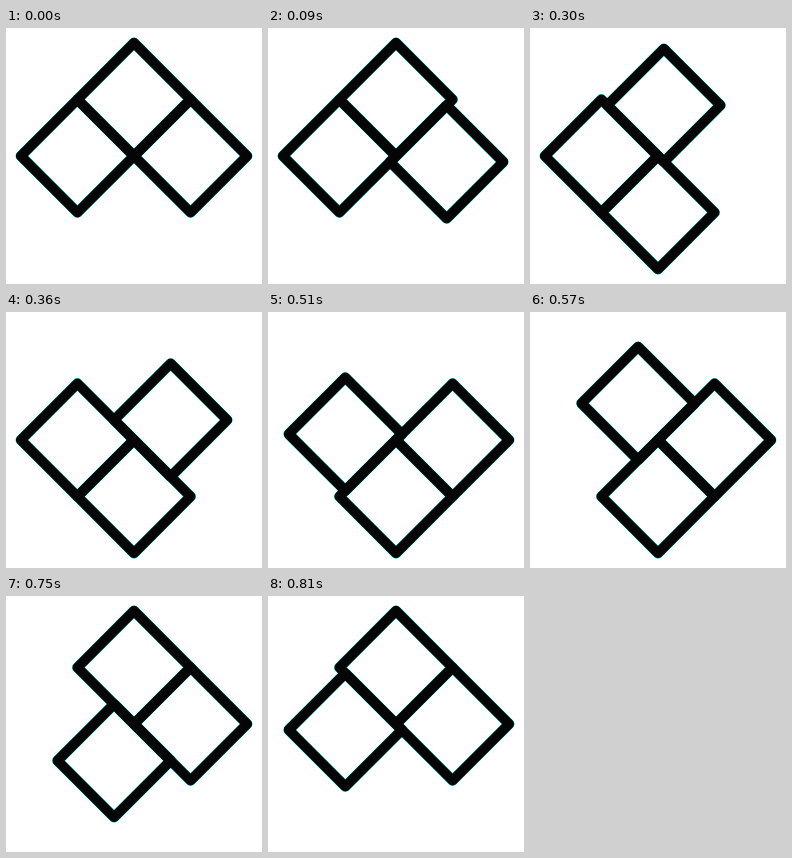
Recreate the animation shown at these times as an HTML page with a canvas. Size 256 by 256 pixels, loop 0.84 s.

```html
<!DOCTYPE html>
<html lang="en">
<head>
<meta charset="utf-8">
<title>Sliding squares</title>
<style>
  html, body { margin: 0; width: 100%; height: 100%; overflow: hidden; background: #fff; }
  canvas { display: block; width: 256px; height: 256px; }
</style>
</head>
<body>
<canvas id="stage" width="256" height="256"></canvas>
<script>
const ctx = document.getElementById('stage').getContext('2d');

const SIZE = 256, SIDE = 80;
const LOOP = 840, STEP = 30, MOVE = 210, REST = 60;

// Top-left corners of a 2x2 grid, clockwise; the grid is drawn turned by 45 degrees.
const slots = [[-SIDE, -SIDE], [0, -SIDE], [0, 0], [-SIDE, 0]];

const slot = i => slots[(i + 4) % 4];
const ease = p => p * p * (3 - 2 * p);

function strokeSquares(squares, color, width) {
  ctx.strokeStyle = color;
  ctx.lineWidth = width;
  for (const [x, y] of squares) ctx.strokeRect(x, y, SIDE, SIDE);
}

function draw(time) {
  const t = Math.floor((time % LOOP) / STEP) * STEP;
  const turn = Math.floor(t / MOVE);
  const p = ease(Math.max(0, (t % MOVE - REST) / (MOVE - REST)));

  // The empty slot travels counter-clockwise; its neighbour slides into it.
  const from = slot(1 - turn), to = slot(2 - turn);
  const moving = from.map((v, i) => v + (to[i] - v) * p);
  const squares = [slot(-turn), slot(3 - turn), moving];

  ctx.fillStyle = '#fff';
  ctx.fillRect(0, 0, SIZE, SIZE);
  ctx.save();
  ctx.translate(SIZE / 2, SIZE / 2);
  ctx.rotate(Math.PI / 4);
  ctx.lineJoin = 'round';
  strokeSquares(squares, '#00f0f0', 10.7);
  strokeSquares(squares, '#050505', 10);
  ctx.restore();
}

function tick() {
  draw(performance.now());
  requestAnimationFrame(tick);
}
tick();
</script>
</body>
</html>
```
